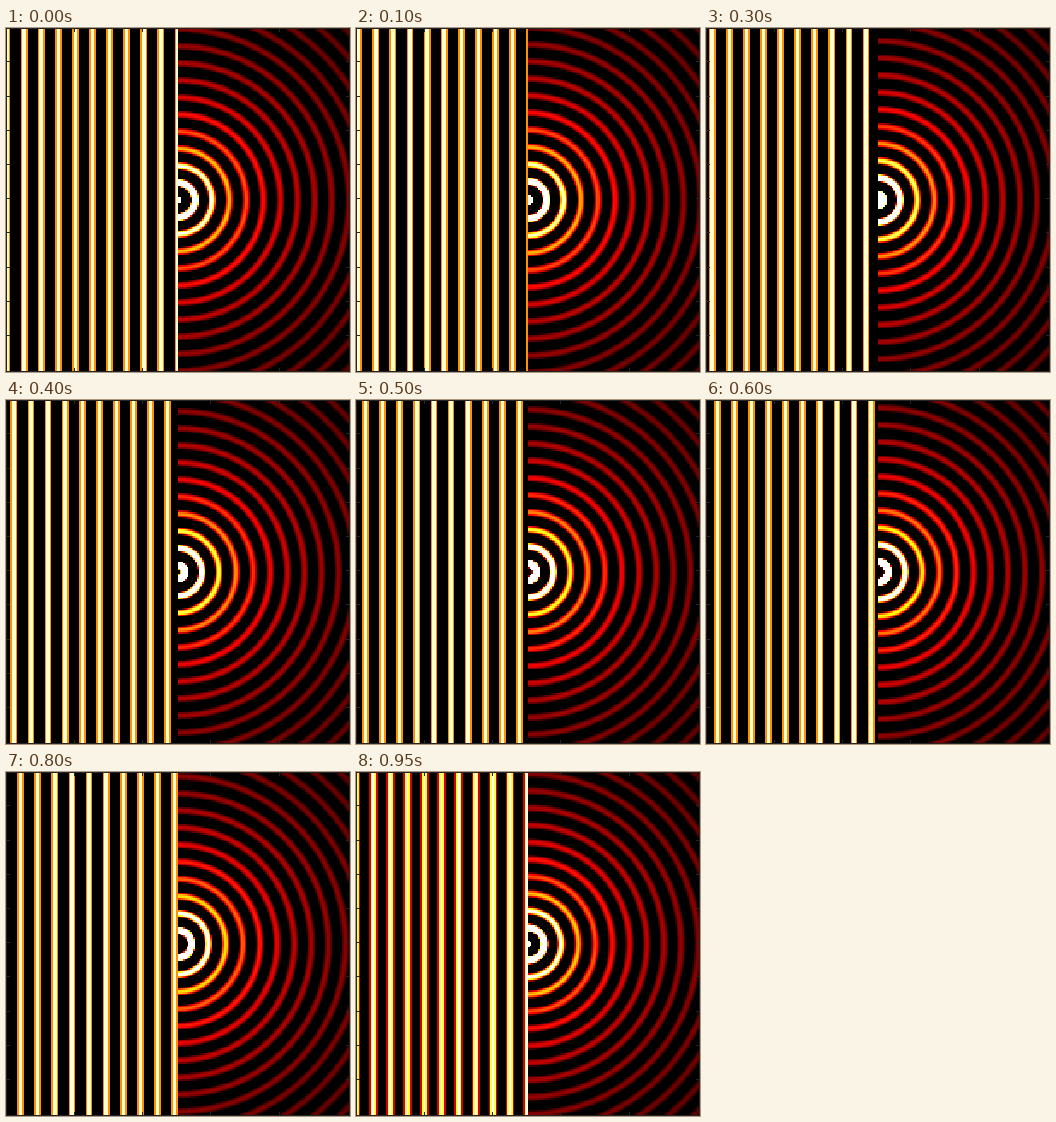
Animation of 344 by 344 pixels, one loop 1000 ms. Source, as an HTML page with a canvas:

```html
<!DOCTYPE html>
<html lang="en">
<head>
<meta charset="utf-8">
<title>Plane wave meeting a point slit</title>
<style>
html, body { margin: 0; width: 100%; height: 100%; overflow: hidden; background: #000; }
canvas { display: block; width: 100%; height: 100%; image-rendering: pixelated; }
</style>
</head>
<body>
<canvas id="stage" width="344" height="344"></canvas>
<script>
const SIZE = 344, INNER = SIZE - 2, CELLS = 200, WAVE = 10;
const STEPS = 20, LOOP = 1000;
const ctx = document.getElementById('stage').getContext('2d');
const img = ctx.createImageData(SIZE, SIZE);
const px = new Uint32Array(img.data.buffer);

const clamp = v => Math.max(0, Math.min(1, v));

// "hot" colour map: black, red, yellow, white
function hot(v) {
  const r = Math.round(255 * clamp(v / 0.375));
  const g = Math.round(255 * clamp((v - 0.375) / 0.375));
  const b = Math.round(255 * clamp((v - 0.75) / 0.25));
  return (255 << 24 | b << 16 | g << 8 | r) >>> 0;
}
const ramp = Array.from({ length: 256 }, (_, i) => hot(i / 255));

// Cell centre in wavelengths, measured from the slit
const coord = i => (i + 0.5 - CELLS / 2) / WAVE;
const cellOf = p => Math.floor((p - 0.5) * CELLS / INNER);

function field(x, y, t) {
  if (x < 0) return Math.cos(2 * Math.PI * (x - t));
  const r = Math.hypot(x, y);
  return 2 / r * Math.cos(2 * Math.PI * (r - t));
}

function drawAxes() {
  ctx.fillStyle = '#262626';
  ctx.fillRect(0, 0, SIZE, 1);
  ctx.fillRect(0, SIZE - 1, SIZE, 1);
  ctx.fillRect(0, 0, 1, SIZE);
  ctx.fillRect(SIZE - 1, 0, 1, SIZE);
  for (let n = 20; n < CELLS; n += 20) {
    const p = Math.round((n - 0.5) * INNER / CELLS);
    ctx.fillRect(0, p, 4, 1);
    ctx.fillRect(SIZE - 4, p, 4, 1);
    if (n % 40 === 0) {
      ctx.fillRect(p, 0, 1, 4);
      ctx.fillRect(p, SIZE - 4, 1, 4);
    }
  }
}

function draw(t) {
  const cells = new Uint32Array(CELLS * CELLS);
  for (let j = 0; j < CELLS; j++)
    for (let i = 0; i < CELLS; i++)
      cells[j * CELLS + i] = ramp[Math.round(255 * clamp(field(coord(i), coord(j), t)))];
  for (let y = 1; y <= INNER; y++) {
    const row = cellOf(y) * CELLS;
    for (let x = 1; x <= INNER; x++) px[y * SIZE + x] = cells[row + cellOf(x)];
  }
  ctx.putImageData(img, 0, 0);
  drawAxes();
}

let shown = -1;
const start = performance.now();
function tick() {
  const time = Math.max(0, performance.now() - start) % LOOP;
  const step = Math.floor(time * STEPS / LOOP);
  if (step !== shown) draw((shown = step) / STEPS);
  requestAnimationFrame(tick);
}
tick();
</script>
</body>
</html>
```
